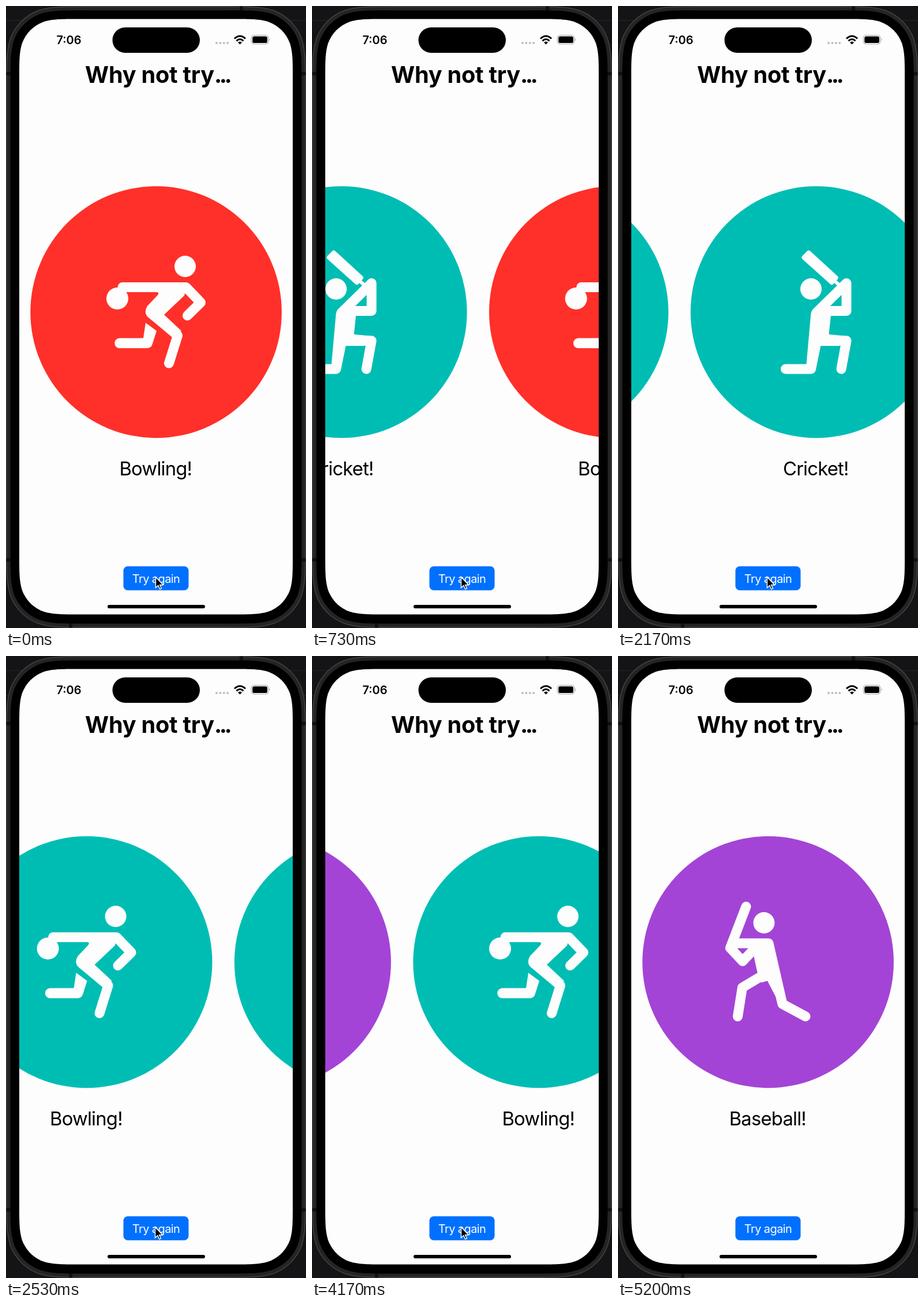
These frames come from a looping animation (520 by 1076 pixels, 5.96 s). An HTML page:

```html
<!DOCTYPE html>
<html lang="en">
<head>
<meta charset="utf-8">
<title>Why not try...</title>
<style>
  html, body { margin: 0; width: 100%; height: 100%; overflow: hidden; background: #141417; }
  svg { display: block; width: 100vw; height: 100vh; font-family: Inter, "Liberation Sans", sans-serif; }
  text { text-anchor: middle; }
  .title { font-size: 39.7px; font-weight: 700; letter-spacing: -.25px; text-anchor: start; }
  .dots { letter-spacing: -4.5px; }
  .glyph { fill: #fdfdfd; }
  .limb { fill: none; stroke: #fdfdfd; stroke-width: 17; stroke-linecap: round; stroke-linejoin: round; }
  .name { font-size: 32.8px; letter-spacing: -.8px; }
</style>
</head>
<body>
<svg viewBox="0 0 520 1076">
  <defs>
    <clipPath id="clip"><path class="screen"/></clipPath>

    <g id="Bowling" class="glyph">
      <circle cx="310.5" cy="450.5" r="18.5"/>
      <circle cx="193" cy="506" r="19"/>
      <path class="limb" d="M202 486.5H312L337.5 513L314.5 535.5M251 531L297.5 570L282.5 618"/>
      <path d="M211 494H258Q267 495 263 500L245 519Q238 530 246 538L290 574L304 562L274 534L309 501L312 490H211Z"/>
      <path d="M242 548L261 562L254 584Q252 592 244 592H197A8.7 8.7 0 0 1 197 574.5H238Z"/>
    </g>

    <g id="Cricket" class="glyph">
      <path d="M247 427L239 435L287 478L294 470Z" stroke="#fdfdfd" stroke-width="8" stroke-linejoin="round"/>
      <path d="M290 474L304 486" stroke="#fdfdfd" stroke-width="6"/>
      <circle cx="251" cy="489.5" r="18.5"/>
      <path class="limb" d="M261 530L312.5 479.5V527.5H277M270 579H312.5L303.5 628M207 628H251L261 579"/>
      <path d="M250.8 533Q251.5 527 256 523L262 518L285.5 535L282 568L312 571L300 588H266L255 625L243 620Z"/>
    </g>

    <g id="Baseball" class="glyph">
      <circle cx="253" cy="461.5" r="18.5"/>
      <path class="limb" d="M222 433.5L194.5 505L216 528L235 508M201 497H261L285 602L325 623.5M250 553L215.5 573.5L207.5 623.5"/>
      <path d="M233 492L262 490L290 600L282 606L259 562L248 565L241 545L236 522Z"/>
    </g>
  </defs>

  <!-- phone body -->
  <rect width="520" height="1076" fill="#141417"/>
  <path d="M0 25H520M0 68H520" stroke="#29292c"/>
  <path id="rim" fill="#242424" stroke="#484848" stroke-width="1.3"/>
  <path d="M1 117H8M512 117H519M1 958H8M512 958H519M408 1V8M112 1068V1075" stroke="#111" stroke-width="6"/>
  <path id="bezel"/>
  <path class="screen" fill="#fdfdfd"/>

  <g clip-path="url(#clip)" id="cards"></g>

  <!-- status bar -->
  <rect x="184.5" y="37" width="151.500" height="44" rx="22"/>
  <text x="109" y="65.700" font-size="20" font-weight="600">7:06</text>
  <path d="M365 64H386" stroke="#bdbdbd" stroke-width="4" stroke-linecap="round" stroke-dasharray="0 6.4"/>
  <path d="M396 56.500Q405.500 47.500 415 56.500M399.500 60.300Q405.500 54.700 411.500 60.300" fill="none" stroke="#000" stroke-width="3"/>
  <path d="M402 63Q405.500 60 409 63L405.500 66.500Z"/>
  <rect x="425.300" y="50.500" width="29.500" height="15.500" rx="4.800" fill="none" stroke="#aaa" stroke-width="1.200"/>
  <rect x="427.200" y="52.400" width="25.700" height="11.700" rx="3.200"/>
  <path d="M456.300 55.800Q459 58.200 456.300 60.700Z" fill="#aaa"/>

  <text class="title" x="137" y="133">Why not try<tspan class="dots">...</tspan></text>

  <rect x="203.500" y="969.300" width="113" height="41.500" rx="7.500" fill="#0070ff"/>
  <text x="260" y="997.500" font-size="20" letter-spacing="-.6" fill="#fff">Try again</text>
  <rect x="176" y="1036" width="169" height="6" rx="3"/>
  <path id="cursor" d="M0 0V17L4 13.300L6.700 19.300L9.200 18.200L6.600 12.400H12Z" stroke="#fff" stroke-width="1.300"/>
</svg>

<script>
const LOOP = 5960, SLIDE = 1000, WIDTH = 474;
const taps = [197, 1880, 3804];
const cards = [
  ['Bowling', '#ff3029'],
  ['Cricket', '#00bdb4'],
  ['Bowling', '#00bdb4'],
  ['Baseball', '#a344d6']
];
const layer = document.getElementById('cards');
const cursor = document.getElementById('cursor');

// Rounded rectangle with continuous-curvature corners, inset from the stage edge
function squircle(inset, r) {
  const right = 520 - inset, bottom = 1076 - inset;
  const bend = [[1.5287, 0], [1.0885, 0], [.8684, 0], [.6315, .0749], [.3728, .1691],
                [.1691, .3728], [.0749, .6315], [0, .8684], [0, 1.0885], [0, 1.5287]];
  const corner = (x, y, sx, sy, flip) => {
    const pts = bend.map(([a, b]) => [x + sx * a * r, y + sy * b * r].join(' '));
    if (flip) pts.reverse();
    return pts[0] + 'C' + pts.slice(1).join(' ');
  };
  return 'M' + [
    corner(inset, inset, 1, 1, false),
    corner(inset, bottom, 1, -1, true),
    corner(right, bottom, -1, -1, false),
    corner(right, inset, -1, 1, true)
  ].join('L') + 'Z';
}

const outline = (selector, inset, r) => document.querySelectorAll(selector)
  .forEach(path => path.setAttribute('d', squircle(inset, r)));
outline('#rim', 1, 88);
outline('#bezel', 7.5, 82);
outline('.screen', 23, 66.3);
document.querySelectorAll('.screen').forEach(path =>
  path.setAttribute('transform', 'translate(0 -.5)'));

layer.innerHTML = cards.map(([name, color]) => `<g>
  <circle cx="260.1" cy="529.5" r="217.8" fill="${color}"/>
  <use href="#${name}"/>
  <text class="name" x="259.3" y="812">${name}!</text>
</g>`).join('');

// Ease-in-out: cubic-bezier(.42, 0, .58, 1)
function ease(x) {
  if (x <= 0) return 0;
  if (x >= 1) return 1;
  let lo = 0, hi = 1, s;
  for (let i = 0; i < 24; i++) {
    s = (lo + hi) / 2;
    const bx = 1.26 * s * (1 - s) ** 2 + 1.74 * s * s * (1 - s) + s ** 3;
    if (bx < x) lo = s; else hi = s;
  }
  return s * s * (3 - 2 * s);
}

const slide = (t, tap) => ease((t - tap) / SLIDE);

function draw(t) {
  [...layer.children].forEach((card, i) => {
    const enter = i ? slide(t, taps[i - 1]) : 1;
    const leave = i < taps.length ? slide(t, taps[i]) : 0;
    const shift = enter - 1 + leave;
    card.setAttribute('transform', `translate(${shift * WIDTH} 0)`);
    card.style.display = Math.abs(shift) < 1 ? '' : 'none';
  });
  cursor.setAttribute('transform', `translate(${t < taps[0] ? 259.5 : 258.5} 988) scale(1.08)`);
  cursor.style.display = t < 5190 ? '' : 'none';
}

const start = performance.now();
function frame() {
  draw((performance.now() - start) % LOOP);
  requestAnimationFrame(frame);
}
frame();
</script>
</body>
</html>
```
